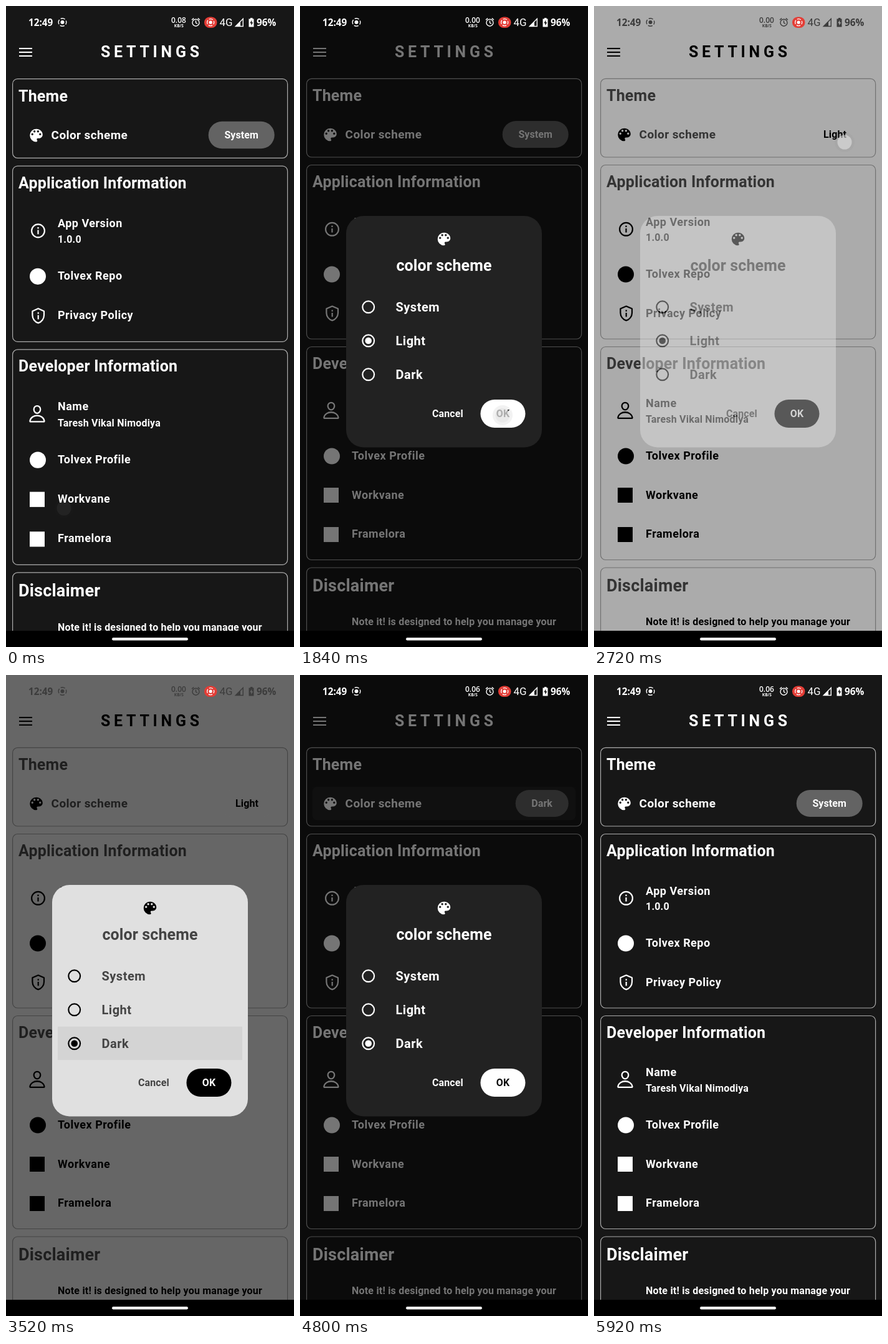
Animation, 462 px wide and 1026 px high, one loop 6.08 s. Source, as an HTML page:

```html
<!DOCTYPE html>
<html lang="en">
<head>
<meta charset="utf-8">
<title>Settings</title>
<style>
html, body { margin: 0; width: 100%; height: 100%; overflow: hidden; background: #000; }
svg { display: block; }
text { font-family: Roboto, sans-serif; font-weight: 700; white-space: pre; }
.h { font-size: 25px; letter-spacing: .2px; fill: var(--head); }
.item { font-size: 18px; letter-spacing: .5px; fill: var(--body); }
.sub { font-size: 16px; letter-spacing: .2px; fill: var(--body); }
.opt { font-size: 20px; letter-spacing: .5px; fill: var(--head); }
.btn { font-size: 16px; letter-spacing: .1px; }
.card { fill: none; stroke: var(--edge); stroke-width: 1.2; }
.fill { fill: var(--icon); }
.line { fill: none; stroke: var(--icon); stroke-width: 2.2; stroke-linejoin: round; }
.bar text { font-family: 'Open Sans', sans-serif; fill: var(--bar); }
.bar .s { fill: none; stroke: var(--bar); stroke-width: 1.4; }
.bar .f { fill: var(--bar); }
</style>
</head>
<body>
<svg id="stage" width="100%" height="100%" viewBox="0 0 462 1026">
  <rect width="462" height="1026" fill="var(--bg)"/>
  <path class="line" d="M21 68h21M21 74h21M21 80h21" style="stroke-width:2"/>
  <text x="152" y="82" font-size="25" letter-spacing="5.7" class="fill">SETTINGS</text>

  <g id="list">
    <g id="cards"></g>
    <g id="rowInk"></g>
    <text class="h" x="20" y="152">Theme</text>
    <g id="pal1"></g>
    <text x="72.6" y="212" font-size="19" letter-spacing=".4" fill="var(--head)">Color scheme</text>
    <rect id="chip" y="184" height="43" rx="21.5" fill="var(--chip)"/>
    <text id="chipText" class="btn fill" x="405" y="211" text-anchor="end"></text>

    <text class="h" x="20" y="290">Application Information</text>
    <circle class="line" cx="51.5" cy="357.3" r="10.4"/>
    <path class="line" d="M51.5 356v6.6M51.5 351.5v2.4"/>
    <path class="line" d="M51.7 480.5l9.3 4.1v6.6c0 5.6-3.9 10.6-9.3 12.2c-5.4-1.6-9.3-6.6-9.3-12.2v-6.6z"/>
    <path class="line" d="M51.7 491v6.6M51.7 486.5v2.4"/>
    <text class="item" x="83" y="351.5">App Version</text>
    <text class="sub" x="83" y="376">1.0.0</text>
    <circle class="fill" cx="51" cy="429.5" r="13"/>
    <text class="item" x="83" y="434.5">Tolvex Repo</text>
    <text class="item" x="83" y="497.5">Privacy Policy</text>

    <text class="h" x="20" y="580.5">Developer Information</text>
    <g transform="translate(34.6 632) scale(.06)">
      <path class="line" style="stroke-width:38" d="M344 144c-4 53-44 96-88 96s-84-43-88-96c-4-55 35-96 88-96s92 42 88 96z"/>
      <path class="line" style="stroke-width:38" d="M256 304c-87 0-175 48-192 139c-2 11 5 21 16 21h352c11 0 18-10 16-21c-17-91-105-139-192-139z"/>
    </g>
    <text class="item" x="83" y="642">Name</text>
    <text class="sub" x="83" y="667">Taresh Vikal Nimodiya</text>
    <circle class="fill" cx="51" cy="720.5" r="13"/>
    <text class="item" x="83" y="725.5">Tolvex Profile</text>
    <rect class="fill" x="38" y="771" width="24" height="24"/>
    <text class="item" x="83" y="788.5">Workvane</text>
    <rect class="fill" x="38" y="834" width="24" height="24"/>
    <text class="item" x="83" y="851">Framelora</text>

    <text x="20" y="936.5" font-size="27" letter-spacing=".2" fill="var(--head)">Disclaimer</text>
    <text class="sub" x="83" y="991">Note it! is designed to help you manage your</text>
  </g>

  <rect id="shade" width="462" height="1026"/>
  <g id="dialog">
    <rect x="74" y="336" width="314" height="370.5" rx="28" fill="var(--panel)"/>
    <g id="optInk"></g>
    <g id="pal2"></g>
    <text x="231" y="423.5" font-size="25" letter-spacing=".1" text-anchor="middle" fill="var(--head)">color scheme</text>
    <g id="options"></g>
    <text class="btn" x="212" y="658" fill="var(--head)">Cancel</text>
    <rect class="fill" x="289.5" y="630" width="72" height="45" rx="22.5"/>
    <text class="btn" x="325.5" y="658" text-anchor="middle" fill="var(--ok)">OK</text>
  </g>

  <g class="bar">
    <text x="36" y="31.5" font-size="15.3">12:49</text>
    <circle class="s" cx="90.5" cy="26" r="6.3" stroke-dasharray="7.4 2.5" stroke-dashoffset="3.7"/>
    <circle class="f" cx="90.5" cy="26" r="3"/>
    <text id="speed" x="265" y="27" font-size="12" style="font-weight:600"></text>
    <text x="277.3" y="34" font-size="6.5" text-anchor="middle">KB/S</text>
    <circle class="s" cx="304.5" cy="26.7" r="5.5"/>
    <path class="s" d="M304.5 23.2v3.7l2.5 1.6M298 22.3l3.2-2.7M311 22.3l-3.2-2.7"/>
    <rect x="318" y="17.5" width="20.5" height="17.5" rx="8.7" fill="#e33d36"/>
    <circle cx="328.2" cy="26.2" r="5.5" fill="none" stroke="#fff" stroke-width="1.3" stroke-dasharray="6.4 2.24" stroke-dashoffset="3.2"/>
    <circle cx="328.2" cy="26.2" r="2.6" fill="#fff"/>
    <text x="342.5" y="32" font-size="17" style="font-family:Roboto,sans-serif;font-weight:400">4G</text>
    <path class="s" d="M380.3 20.5v12h-12z"/>
    <path class="f" d="M376 25v8h-8z"/>
    <path class="f" fill-rule="evenodd" d="M392 19h3.5v1.5h2v13h-8v-13h2.5zM394.3 22.5l-3 5h2v3.8l3-5h-2z"/>
    <text x="402" y="31.5" font-size="15.3">96%</text>
  </g>
  <rect y="1000" width="462" height="26"/>
  <rect x="170" y="1011" width="122" height="4.4" rx="2.2" fill="#f4f4f4"/>
  <g id="touch">
    <circle r="16" fill="#888" opacity=".15"/>
    <circle r="11.5" fill="#e2e2e2"/>
  </g>
</svg>
<script>
const LOOP = 6080, STEP = 80;
const $ = id => document.getElementById(id);
const NS = 'http://www.w3.org/2000/svg';
const stage = $('stage');

function add(parent, tag, attrs) {
  const el = document.createElementNS(NS, tag);
  put(el, attrs);
  return parent.appendChild(el);
}
function put(el, attrs) {
  for (const k in attrs) el.setAttribute(k, attrs[k]);
}
const ramp = (t, start, len) => Math.min(1, Math.max(0, (t - start) / len));
const mix = (a, b, p) => a + (b - a) * p;
const gray = v => `rgb(${[v, v, v].map(Math.round)})`;
const paint = (name, dark, light, p) =>
  stage.style.setProperty('--' + name, gray(mix(dark, light, p)));

// outlined sections
[[116.4, 125.6], [254.5, 278.5], [545.5, 341], [899, 160]].forEach(([y, height]) =>
  add($('cards'), 'rect', { class: 'card', x: 10.6, y, width: 441, height, rx: 8 }));

// palette with four paint wells
const board = 'M0-9a9 9 0 0 0 0 18c.83 0 1.5-.67 1.5-1.5 0-.39-.15-.74-.39-1.01' +
  '-.23-.26-.38-.61-.38-.99 0-.83.67-1.5 1.5-1.5H4c2.76 0 5-2.24 5-5C9-5.42 4.97-9 0-9z';
const wells = [[-7, -1.5], [-4, -5.5], [1, -5.5], [4, -1.5]]
  .map(([x, y]) => `M${x} ${y}a1.5 1.5 0 1 0 3 0a1.5 1.5 0 1 0-3 0z`).join('');
[['pal1', 48.5, 206], ['pal2', 231, 373]].forEach(([id, x, y]) =>
  add($(id), 'path', { class: 'fill', 'fill-rule': 'evenodd', d: board + wells,
    transform: `translate(${x} ${y}) scale(1.14)` }));

const names = ['System', 'Light', 'Dark'];
const chipWidth = [106, 88, 85];
const dots = names.map((name, i) => {
  const y = 481.8 + 54 * i, box = $('options');
  add(box, 'circle', { class: 'line', cx: 109.7, cy: y, r: 9.4 });
  add(box, 'text', { class: 'opt', x: 153.5, y: y + 6.8 }).textContent = name;
  return add(box, 'circle', { class: 'fill', cx: 109.7, cy: y });
});

// highlight and growing wave of a pressed row
function ink(parent, start, end, x, y, width, height, rx, px, power) {
  const box = add(parent, 'svg', { x, y, width, height });
  const flat = add(box, 'rect', { width, height, rx, fill: 'var(--ink)' });
  const wave = add(box, 'circle', { cx: px - x, cy: height / 2, fill: 'var(--ink)' });
  return t => {
    const a = power * ramp(t, start, 150) * (1 - ramp(t, end, 160));
    put(flat, { opacity: a * .8 });
    put(wave, { opacity: a * .2, r: ramp(t, start, 300) * width });
  };
}
const inks = [
  [200, 1000, .1], [4360, 4720, .1]
].map(([a, b, p]) => ink($('rowInk'), a, b, 20, 179, 422, 53.5, 8, 402, p)).concat([
  [1200, 1560, 509, .07], [3200, 3700, 562.5, .05], [4960, 5300, 455, .07]
].map(([a, b, y, p]) => ink($('optInk'), a, b, 83, y, 296, 54, 0, 190, p)));

// finger: down, up, x, y
const taps = [
  [-400, -120, 93, 804], [160, 370, 402, 214], [1200, 1360, 190, 537],
  [1840, 1990, 325, 655], [2480, 2690, 402, 218], [3200, 3360, 190, 592],
  [3680, 3830, 325, 655], [4320, 4530, 402, 214], [4960, 5100, 190, 483],
  [5600, 5740, 325, 655]
];
const opens = [[370, 2012], [2648, 3852], [4530, 5755]];
const picks = [[-500, 1360, 0], [1360, 3360, 1], [3360, 5080, 2], [5080, 9000, 0]];

function draw(t) {
  const shift = (a, b, len) => ramp(t, a, len) - ramp(t, b, len);
  const theme = shift(2004, 3844, 200);
  const words = shift(2145, 3985, 230);
  paint('bg', 23, 224, theme);
  paint('panel', 34, 224, theme);
  paint('chip', 99, 224, theme);
  paint('edge', 172, 148, theme);
  paint('icon', 255, 0, theme);
  paint('ok', 16, 255, theme);
  paint('ink', 255, 0, theme);
  paint('head', 255, 68, words);
  paint('body', 255, 0, words);
  paint('bar', 255, 60, shift(2070, 3910, 160));

  const pull = 1 + .0099 * (1 - ramp(t, 0, 320)) ** 2;
  put($('list'), { transform: `translate(0 ${100 - 100 * pull}) scale(1 ${pull})` });

  const now = t < 2000 ? 0 : t < 3840 ? 1 : t < 5755 ? 2 : 0;
  $('chipText').textContent = names[now];
  put($('chip'), { x: 430.7 - chipWidth[now], width: chipWidth[now] });
  $('speed').textContent = t < 480 ? '0.08' : t < 4480 ? '0.00' : '0.06';

  const open = len => opens.reduce((sum, [a, b]) => sum + shift(a, b, len), 0);
  put($('shade'), { opacity: .54 * open(162) });
  put($('dialog'), { opacity: open(150) });

  const size = [0, 0, 0];
  picks.forEach(([a, b, i]) => { size[i] += shift(a, b, 120); });
  dots.forEach((dot, i) => put(dot, { r: 5.3 * size[i] }));
  inks.forEach(update => update(t));

  const tap = taps.filter(p => t >= p[0]).pop();
  const press = ramp(t, tap[0] - 40, 40) * (1 - ramp(t, tap[1], 130));
  put($('touch'), { transform: `translate(${tap[2]} ${tap[3]})`, opacity: .75 * press });
}

const begin = performance.now();
function tick() {
  const t = (performance.now() - begin) % LOOP;
  draw(Math.floor(t / STEP) * STEP);
  requestAnimationFrame(tick);
}
tick();
</script>
</body>
</html>
```
